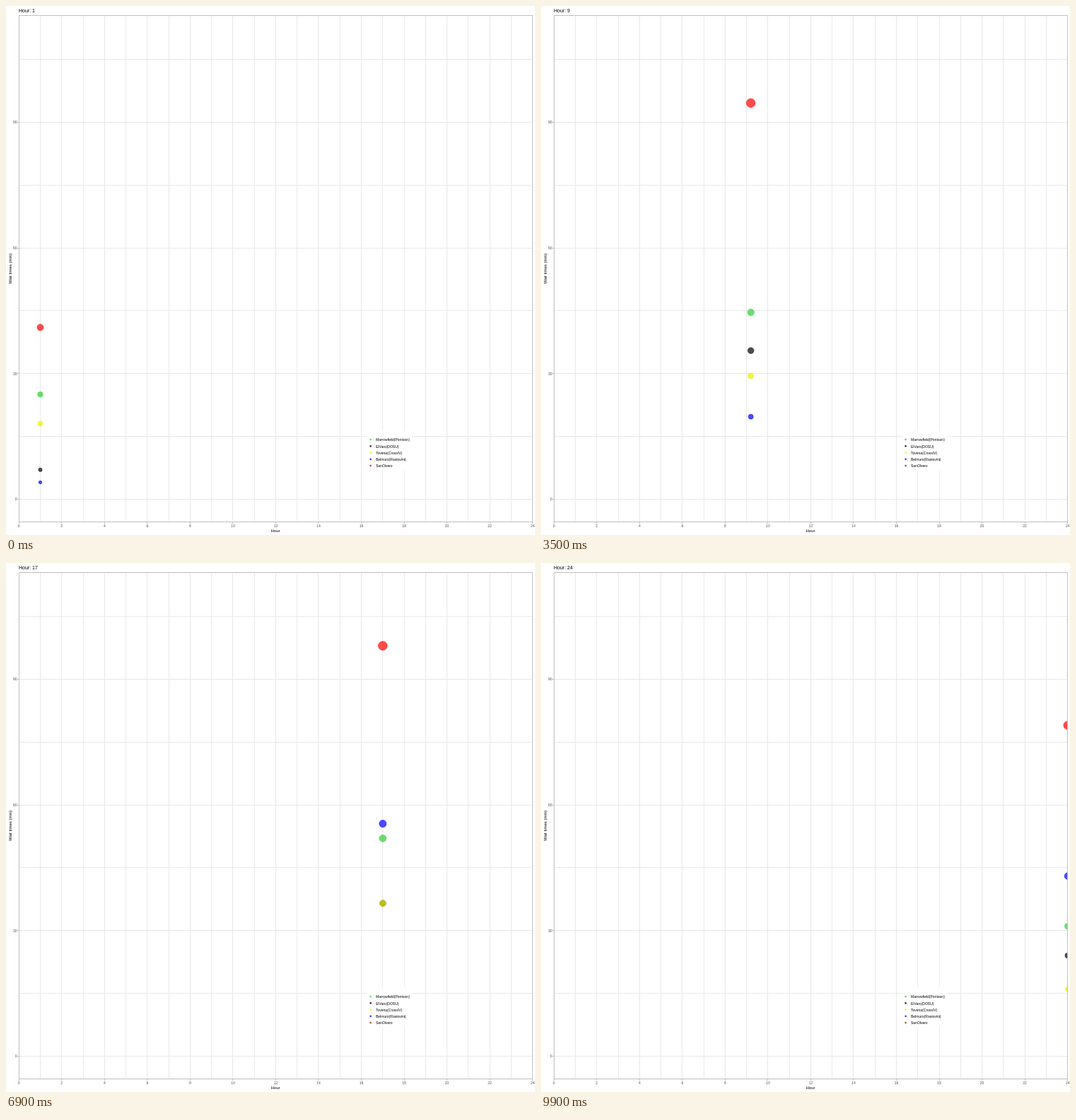
Write an HTML page that moves like this. It is 748x748 px and loops after 10 s.

```html
<!DOCTYPE html>
<html lang="en">
<head>
<meta charset="utf-8">
<title>Wait times by hour</title>
<style>
  html, body { margin: 0; width: 100%; height: 100%; overflow: hidden; background: #fff; }
  svg { display: block; width: 748px; height: 748px; font-family: "Liberation Sans", Arial, sans-serif; }
  .line { stroke: #e8e8e8; shape-rendering: crispEdges; }
  .edge { stroke: #bebebe; fill: none; shape-rendering: crispEdges; }
  .tick { font-size: 5px; fill: #4d4d4d; }
  .mid { text-anchor: middle; }
  .end { text-anchor: end; }
  .axis { font-size: 6px; }
  .key { font-size: 5px; }
  .dot { fill-opacity: .7; stroke-opacity: .7; stroke-width: .8; }
</style>
</head>
<body>
<svg viewBox="0 0 748 748"></svg>
<script>
const svg = document.querySelector('svg');
const left = 18.2, right = 744.7, ceiling = 13.4, floor = 729.7;
const px = hour => left + 30.27 * hour;
const py = wait => 697.2 - 5.92 * wait;
const radius = wait => 1.6 + 5.4 * Math.sqrt(wait / 110);

// Waits in minutes at the turning hours; straight lines join them
const turns = [1, 4, 6, 9, 12, 13, 15, 19, 21, 24];
const series = [
  { name: 'Marrowfield(Pontoon)', color: '#32cd32', waits: [25, 26, 35, 46, 25, 28, 46, 58, 54, 31] },
  { name: 'ElVaro(DOSU)', color: '#000', waits: [7, 16, 33, 36, 28, 30, 40, 33, 33, 24] },
  { name: 'Tovena(CrossIV)', color: '#ee0', waits: [18, 14, 29, 30, 21, 17, 48, 25, 32, 16] },
  { name: 'Belmuro(Rastovini)', color: '#00f', waits: [4, 0, 41, 19.5, 22, 26, 56, 55, 57, 43] },
  { name: 'SanOlvero', color: '#f00', keyColor: '#a01818', waits: [41, 62, 81, 95, 89, 94, 110, 86, 87, 79] }
];

const mix = (a, b, part) => a + (b - a) * part;

function waitAt(waits, hour) {
  const i = Math.max(1, turns.findIndex(turn => turn >= hour));
  return mix(waits[i - 1], waits[i], (hour - turns[i - 1]) / (turns[i] - turns[i - 1]));
}

function add(tag, attrs, text = '', parent = svg) {
  const node = document.createElementNS('http://www.w3.org/2000/svg', tag);
  for (const name in attrs) node.setAttribute(name, attrs[name]);
  node.textContent = text;
  return parent.appendChild(node);
}
const line = (cls, x1, y1, x2, y2) => add('line', { class: cls, x1, y1, x2, y2 });
const label = (cls, x, y, text) => add('text', { class: cls, x, y }, text);

// Grid, ticks and axis labels
for (let h = 1; h < 24; h++) line('line', px(h), ceiling, px(h), floor);
for (let w = 0; w <= 105; w += 15) line('line', left, py(w), right, py(w));
for (let h = 0; h <= 24; h += 2) {
  line('edge', px(h), floor, px(h), floor + 2);
  label('tick mid', px(h), 737, h);
}
for (let w = 0; w <= 90; w += 30) {
  line('edge', left - 2, py(w), left, py(w));
  label('tick end', 15.6, py(w) + 1.9, w);
}
label('axis mid', 381, 744, 'Hour');
add('text', { class: 'axis mid', transform: 'translate(8 371.5) rotate(-90)' }, 'Wait times (min)');
const title = add('text', { x: 18, y: 9, 'font-size': 7 });

// Moving dots, cut off at the panel edge
const clip = add('clipPath', { id: 'panel' });
add('rect', { x: 18, y: 13, width: 727, height: 717 }, '', clip);
const panel = add('g', { 'clip-path': 'url(#panel)' });
for (const s of series) {
  s.dot = add('circle', { class: 'dot', fill: s.color, stroke: s.color }, '', panel);
}
add('rect', { class: 'edge', x: left, y: ceiling, width: right - left, height: floor - ceiling });

// Legend
add('rect', { x: 511, y: 600, width: 63, height: 57, fill: '#fff' });
series.forEach(({ name, color, keyColor = color }, i) => {
  const y = 613.1 + 9.25 * i;
  add('circle', { cx: 515.6, cy: y, r: 1.3, fill: keyColor, 'fill-opacity': .8 });
  label('key', 523, y + 2.2, name);
});

// Each hour is reached on a whole step of the 100-step loop
const stepOf = hour => Math.round((hour - 1) * 99 / 23);

function draw(now) {
  const step = Math.floor(now / 100) % 100;
  let hour = 1;
  while (hour < 23 && stepOf(hour + 1) <= step) hour++;
  hour += (step - stepOf(hour)) / (stepOf(hour + 1) - stepOf(hour));
  for (const { dot, waits } of series) {
    const wait = waitAt(waits, hour);
    dot.setAttribute('cx', px(hour));
    dot.setAttribute('cy', py(wait));
    dot.setAttribute('r', radius(wait) - .4);
  }
  title.textContent = 'Hour: ' + Math.round(1 + 23 * step / 99);
}

const start = performance.now();
function tick() {
  draw(performance.now() - start);
  requestAnimationFrame(tick);
}
tick();
</script>
</body>
</html>
```
